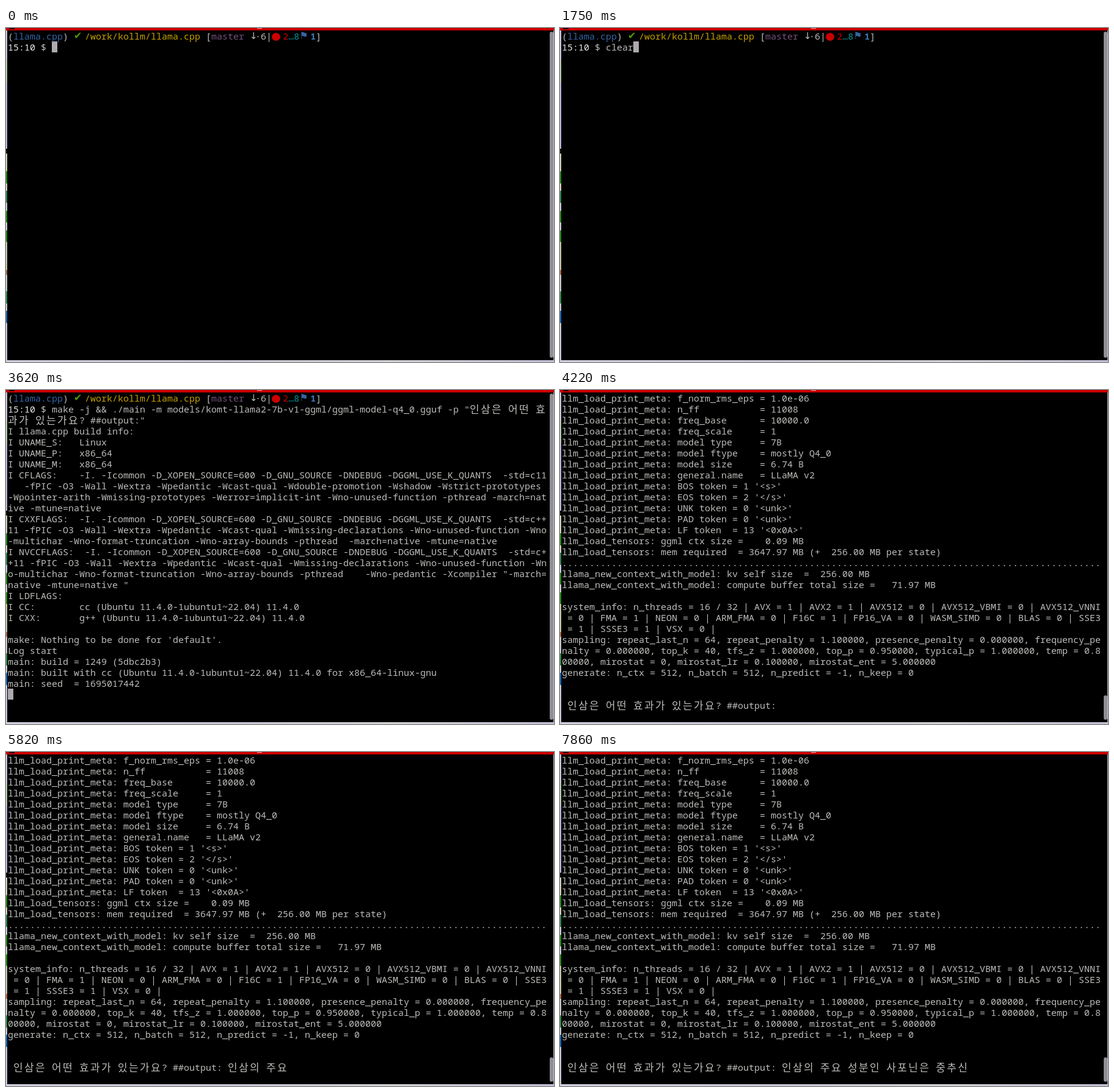
These frames come from a looping animation (897 by 548 pixels, 8000 ms). An HTML page:

```html
<!DOCTYPE html>
<html lang="ko">
<head>
<meta charset="utf-8">
<title>Terminal</title>
<style>
html, body { margin: 0; width: 100%; height: 100%; overflow: hidden; background: #000; }
#stage { position: absolute; left: 0; top: 0; width: 897px; height: 548px; overflow: hidden; background: #000; }
#stage > div { position: absolute; }
#rows { left: 3px; top: 4px; width: 886px; height: 536px; overflow: hidden; color: #bcbdb9; }
.row { height: 18px; white-space: pre; font: 15px/18px "Noto Sans Mono", "DejaVu Sans Mono", monospace; font-variant-ligatures: none; }
.row span { color: inherit; }
.row .wide, .row .mark, .row .arrow, .row .dot {
  display: inline-block; width: 18px; height: 18px; line-height: 18px; vertical-align: top;
}
.wide { font-family: "Noto Sans CJK KR", "Noto Sans CJK", sans-serif; font-size: 17px; }
.mark { font-family: "DejaVu Sans", sans-serif; font-size: 16px; }
.row .arrow { width: 9px; font-family: "DejaVu Sans", sans-serif; }
.row .dot::before { content: ""; display: block; width: 14px; height: 13px; margin-top: 4px; border-radius: 50%; background: #cc0000; }
.row .blue { color: #3465a4; }
.row .green { color: #4e9a06; }
.row .yellow { color: #c4a000; }
.row .purple { color: #75507b; }
.row .red { color: #cc0000; }
.row .cyan { color: #06989a; }
.row .bright { color: #e9e9e7; }
.row .num { color: #3d78b5; font-weight: bold; }
#cursor { width: 9px; height: 18px; background: #aeaaae; }
#thumb { left: 890px; width: 6px; border-radius: 3px; background: #918f92; }
#top { left: 0; top: 0; width: 897px; height: 4px; background: #cc0000; }
#icon { left: 5px; top: 0; width: 9px; height: 2px; background: #200; }
#at { left: 411px; top: 0; width: 8px; height: 1px; background: #e8b0b0; }
#left {
  left: 0; top: 4px; width: 2px; height: 544px;
  background: linear-gradient(#c9c5dd 0 46px, #b9c9b0 46px 84px, #b8b4dc 84px 194px, #111 194px 202px,
    #cfcfb8 202px 231px, #1f8a10 231px 251px, #d2cfbb 251px 263px, #2a8453 263px 283px, #c9c9dd 283px 296px,
    #208a08 296px 315px, #c9c9d8 315px 328px, #208a08 328px 347px, #c8c4a4 347px 393px, #b5643c 393px 401px,
    #c7c6cc 401px 428px, #2d8a45 428px 448px, #c7c7d4 448px 460px, #0d67bd 460px 480px, #c8c6d4 480px);
}
#right { left: 896px; top: 4px; width: 1px; height: 544px; background: #c0bbd0; }
#bottom { left: 0; top: 545px; width: 897px; height: 3px; background: linear-gradient(90deg, #d2cfdf, #c9c8d5 40%, #d4d2d6 70%, #c5bfd6); }
</style>
</head>
<body>
<div id="stage">
  <div id="cursor"></div>
  <div id="rows"></div>
  <div id="thumb"></div>
  <div id="left"></div>
  <div id="right"></div>
  <div id="bottom"></div>
  <div id="top"></div>
  <div id="icon"></div>
  <div id="at"></div>
</div>
<script>
const LOOP = 8000, COLS = 98, ROWS = 29, CELL = 9, LINE = 18;
const $ = id => document.getElementById(id);
const isWide = c => /[가-힣]/.test(c);
const cells = s => [...s].reduce((n, c) => n + (isWide(c) ? 2 : 1), 0);

function wrap(text) {
  const out = [];
  let line = "", used = 0;
  for (const c of text) {
    const w = cells(c);
    if (used + w > COLS) { out.push(line); line = ""; used = 0; }
    line += c;
    used += w;
  }
  return [...out, line];
}
const wrapAll = lines => lines.flatMap(wrap);

const PROMPT = [
  ["", "("], ["blue", "llama.cpp"], ["", ") "], ["mark green", "✔"], ["yellow", "/work/kollm/llama.cpp"],
  ["", " ["], ["purple", "master"], ["", " "], ["arrow", "↓"], ["", "·6|"], ["dot", ""], ["red", "2"],
  ["cyan", "…8"], ["mark blue", "⚑"], ["num", "1"], ["", "]"]
];
const QUESTION = "인삼은 어떤 효과가 있는가요? ##output:";
const MODEL = "models/komt-llama2-7b-v1-ggml/ggml-model-q4_0.gguf";
const MAKE = `make -j && ./main -m ${MODEL} -p "${QUESTION}"`;
const ANSWER = " 인삼의 주요 성분인 사포닌은 중추신";

const defs = "-I. -Icommon -D_XOPEN_SOURCE=600 -D_GNU_SOURCE -DNDEBUG -DGGML_USE_K_QUANTS  ";
const warn = "-fPIC -O3 -Wall -Wextra -Wpedantic -Wcast-qual ";
const cxx = defs + "-std=c++11 " + warn + "-Wmissing-declarations -Wno-unused-function -Wno-multichar " +
  "-Wno-format-truncation -Wno-array-bounds -pthread  ";
const info = (key, value) => ("I " + key + ":").padEnd(13) + value;

const BUILD = wrapAll([
  "I llama.cpp build info: ",
  info("UNAME_S", "Linux"), info("UNAME_P", "x86_64"), info("UNAME_M", "x86_64"),
  info("CFLAGS", defs + "-std=c11   " + warn + "-Wdouble-promotion -Wshadow -Wstrict-prototypes " +
    "-Wpointer-arith -Wmissing-prototypes -Werror=implicit-int -Wno-unused-function -pthread -march=native -mtune=native"),
  info("CXXFLAGS", cxx + "-march=native -mtune=native"),
  "I NVCCFLAGS:  " + cxx + "  -Wno-pedantic -Xcompiler \"-march=native -mtune=native \"",
  "I LDFLAGS:",
  info("CC", "cc (Ubuntu 11.4.0-1ubuntu1~22.04) 11.4.0"),
  info("CXX", "g++ (Ubuntu 11.4.0-1ubuntu1~22.04) 11.4.0"),
  "",
  "make: Nothing to be done for 'default'.",
  "Log start",
  "main: build = 1249 (5dbc2b3)",
  "main: built with cc (Ubuntu 11.4.0-1ubuntu1~22.04) 11.4.0 for x86_64-linux-gnu",
  "main: seed  = 1695017442"
]);

const PARTS = ["attn_q", "attn_k", "attn_v", "attn_output", "ffn_gate", "ffn_up", "ffn_down", "attn_norm", "ffn_norm"];
function tensorLine(i) {
  const part = PARTS[(i - 1) % 9];
  const name = i === 0 ? "token_embd" : i === 289 ? "output_norm" : i === 290 ? "output" : `blk.${Math.floor((i - 1) / 9)}.${part}`;
  const norm = name.endsWith("norm");
  const dims = [name.endsWith("ffn_down") ? 11008 : 4096,
    norm ? 1 : i === 0 || i === 290 ? 32000 : /gate|up/.test(name) ? 11008 : 4096, 1, 1];
  return `llama_model_loader: - tensor ${String(i).padStart(4)}: ${(name + ".weight").padStart(32)} ` +
    `${(norm ? "f32" : i === 290 ? "q6_K" : "q4_0").padEnd(8)} [ ${dims.map(d => String(d).padStart(5)).join(", ")} ]`;
}
const TENSORS = wrapAll([
  `llama_model_loader: loaded meta data with 19 key-value pairs and 291 tensors from ${MODEL} (version GGUF V2 (latest))`,
  ...Array.from({ length: 291 }, (_, i) => tensorLine(i))
]);

const meta = (key, value) => `llm_load_print_meta: ${key.padEnd(15)}= ${value}`;
const token = (key, value) => `llm_load_print_meta: ${key.padEnd(9)} = ${value}`;
const LOAD = wrapAll([
  "llama_model_loader: - type  f32:   65 tensors",
  "llama_model_loader: - type q4_0:  225 tensors",
  "llama_model_loader: - type q6_K:    1 tensors",
  meta("format", "GGUF V2 (latest)"), meta("arch", "llama"), meta("vocab type", "SPM"),
  meta("n_vocab", "32000"), meta("n_merges", "0"), meta("n_ctx_train", "2048"), meta("n_ctx", "512"),
  meta("n_embd", "4096"), meta("n_head", "32"), meta("n_head_kv", "32"), meta("n_layer", "32"),
  meta("n_rot", "128"), meta("n_gqa", "1"), meta("f_norm_eps", "0.0e+00"),
  meta("f_norm_rms_eps", "1.0e-06"), meta("n_ff", "11008"), meta("freq_base", "10000.0"), meta("freq_scale", "1"),
  meta("model type", "7B"), meta("model ftype", "mostly Q4_0"), meta("model size", "6.74 B"),
  meta("general.name", "LLaMA v2"),
  token("BOS token", "1 '<s>'"), token("EOS token", "2 '</s>'"), token("UNK token", "0 '<unk>'"),
  token("PAD token", "0 '<unk>'"), token("LF token", "13 '<0x0A>'"),
  "llm_load_tensors: ggml ctx size =    0.09 MB",
  "llm_load_tensors: mem required  = 3647.97 MB (+  256.00 MB per state)",
  ".".repeat(COLS),
  "llama_new_context_with_model: kv self size  =  256.00 MB",
  "llama_new_context_with_model: compute buffer total size =   71.97 MB"
]);
const RUN = wrapAll([
  "",
  "system_info: n_threads = 16 / 32 | AVX = 1 | AVX2 = 1 | AVX512 = 0 | AVX512_VBMI = 0 | AVX512_VNNI = 0 | FMA = 1 | " +
    "NEON = 0 | ARM_FMA = 0 | F16C = 1 | FP16_VA = 0 | WASM_SIMD = 0 | BLAS = 0 | SSE3 = 1 | SSSE3 = 1 | VSX = 0 | ",
  "sampling: repeat_last_n = 64, repeat_penalty = 1.100000, presence_penalty = 0.000000, frequency_penalty = 0.000000, " +
    "top_k = 40, tfs_z = 1.000000, top_p = 0.950000, typical_p = 1.000000, temp = 0.800000, mirostat = 0, " +
    "mirostat_lr = 0.100000, mirostat_ent = 5.000000",
  "generate: n_ctx = 512, n_batch = 512, n_predict = -1, n_keep = 0",
  "", ""
]);

const shell = cmd => {
  const [first, ...rest] = wrap("15:10 $ " + cmd);
  return [PROMPT, [["bright", "15:10"], ["", first.slice(5)]], ...rest];
};
const started = shell(MAKE);
const built = [...started, ...BUILD];
const listing = n => [...built, ...TENSORS.slice(0, n), ""];
const loaded = [...built, ...TENSORS, ...LOAD];
const ready = [...loaded, ...RUN];
const answer = n => [...ready, " " + QUESTION + ANSWER.slice(0, n)];

// time, lines, cursor shown
const STEPS = [
  [0, shell(""), true],
  [180, shell(""), false],
  [800, shell(""), true],
  [1380, shell(""), false],
  [1750, shell("clear"), true],
  [2140, started, true],
  [2840, [...started, ""], true],
  [3620, [...built, ""], true],
  [3660, listing(150), true],
  [3700, listing(320), true],
  [3740, listing(500), true],
  [3780, [...loaded, ""], true],
  [4190, [...ready, ""], false],
  [4220, answer(0), false],
  // time and number of answer characters
  ...[[5010, 2], [5540, 3], [5710, 4], [5760, 6], [5820, 7], [6340, 9], [6430, 10], [6520, 11], [6890, 13],
    [7120, 14], [7220, 15], [7320, 16], [7750, 18], [7800, 19], [7860, 20]].map(([t, n]) => [t, answer(n), false])
];

function addSpan(row, cls, text) {
  const span = document.createElement("span");
  span.className = cls;
  span.textContent = text;
  row.append(span);
}
function makeRow(line) {
  const row = document.createElement("div");
  row.className = "row";
  for (const [cls, text] of Array.isArray(line) ? line : [["", line]]) {
    if (!text) { if (cls) addSpan(row, cls, ""); continue; }
    for (const run of text.match(/[가-힣]|[^가-힣]+/g)) {
      addSpan(row, isWide(run[0]) ? "wide" : cls, run);
    }
  }
  return row;
}

function show([, lines, cursorOn]) {
  const view = lines.slice(-ROWS);
  $("rows").replaceChildren(...view.map(makeRow));

  const last = view[view.length - 1];
  const text = Array.isArray(last) ? last.map(p => p[1]).join("") : last;
  const cursor = $("cursor").style;
  cursor.visibility = cursorOn ? "visible" : "hidden";
  cursor.left = 3 + cells(text) * CELL + "px";
  cursor.top = 4 + (view.length - 1) * LINE + "px";

  const track = 535;
  const size = Math.max(40, track * Math.min(1, ROWS / lines.length));
  $("thumb").style.height = size + "px";
  $("thumb").style.top = 6 + track - size + "px";
}

let current = -1;
const start = performance.now();
function tick() {
  const t = (performance.now() - start) % LOOP;
  const i = STEPS.findLastIndex(s => s[0] <= t);
  if (i !== current) show(STEPS[current = i]);
  requestAnimationFrame(tick);
}
tick();
</script>
</body>
</html>
```
